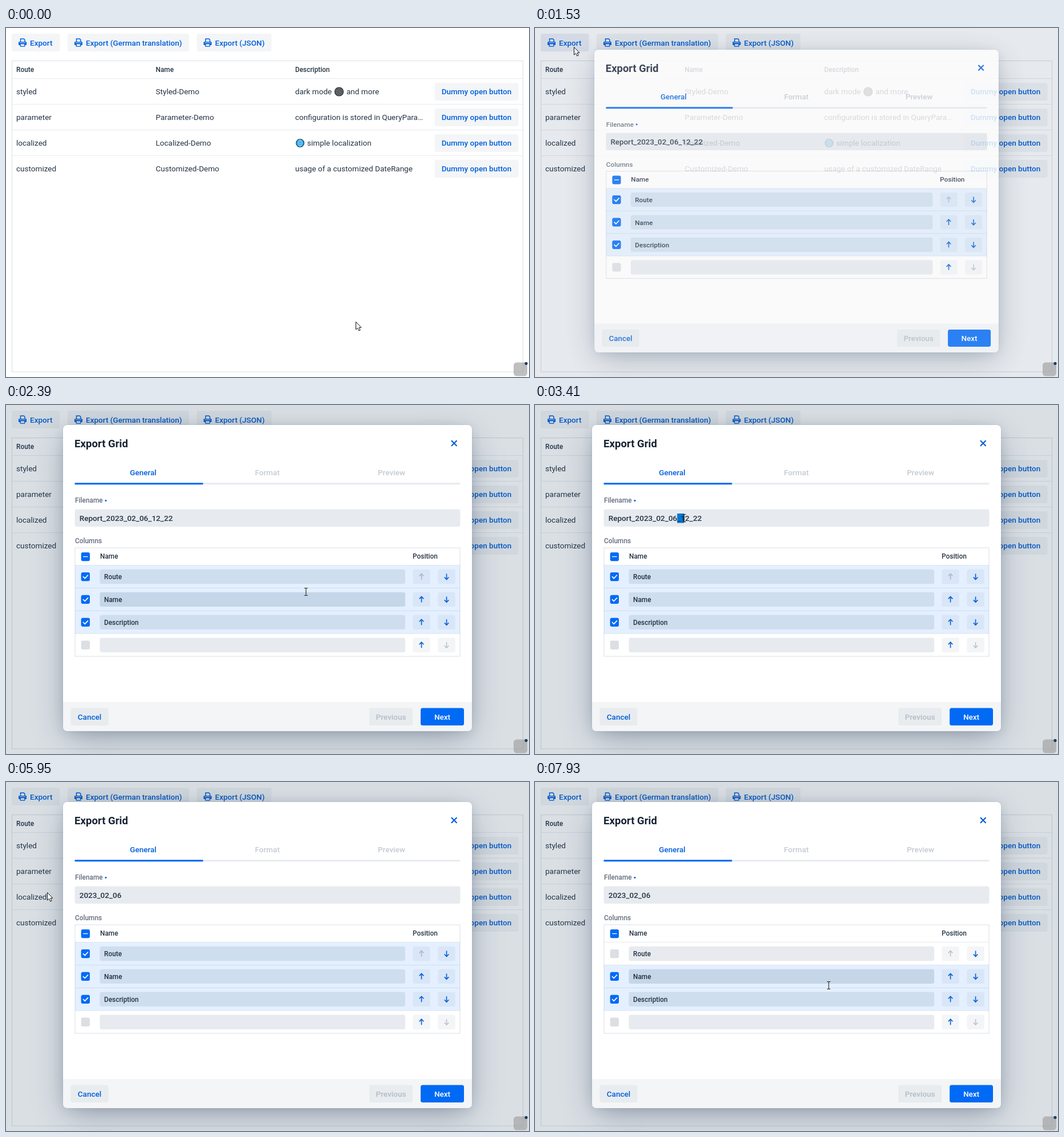
Write an HTML page that moves like this. It is 917 by 611 pixels and loops after 7990 ms.

```html
<!DOCTYPE html>
<html lang="en">
<head>
<meta charset="utf-8">
<title>Export Grid</title>
<style>
html, body { margin: 0; width: 100%; height: 100%; overflow: hidden; background: #fff; }
svg, #shade, #dialog { position: absolute; left: 0; top: 0; width: 917px; height: 611px; }
#shade { background: hsla(214, 53%, 23%, .16); }
#dialog { transform-origin: 458.5px 303px; }
#panel {
  position: absolute; left: 100px; top: 35px; width: 717px; height: 536px;
  border-radius: 7px; background: #fff;
  box-shadow: 0 0 0 1px hsla(214, 61%, 25%, .05),
    0 3px 20px -3px hsla(214, 53%, 23%, .16),
    0 15px 54px -7px hsla(214, 47%, 21%, .38);
}
text { font-family: Roboto, "Liberation Sans", sans-serif; font-size: 13.55px; fill: hsla(214, 40%, 16%, .94); white-space: pre; }
.s { font-size: 11.86px; }
.m { font-weight: 500; }
.link { fill: hsl(214, 100%, 43%); }
.label { fill: hsla(214, 42%, 18%, .69); }
.off { fill: hsla(214, 50%, 22%, .26); }
.on { fill: #fff; }
.mid { text-anchor: middle; }
.title { font-size: 18.6px; font-weight: 600; fill: hsl(214, 35%, 15%); }
</style>
</head>
<body>
<svg id="page"></svg>
<div id="shade"></div>
<div id="dialog"><div id="panel"></div><svg id="form"></svg></div>
<svg id="top"></svg>
<script>
const LOOP = 7990;
const S5 = 'hsla(214,61%,25%,.05)', S10 = 'hsla(214,57%,24%,.1)', S20 = 'hsla(214,53%,23%,.16)';
const S30 = 'hsla(214,50%,22%,.26)', BLUE = 'hsl(214,100%,48%)', LINK = 'hsl(214,100%,43%)';
const $ = id => document.getElementById(id);

function add(parent, tag, attrs, content) {
  const el = document.createElementNS('http://www.w3.org/2000/svg', tag);
  for (const k in attrs) el.setAttribute(k, attrs[k]);
  if (content !== undefined) el.textContent = content;
  parent.appendChild(el);
  return el;
}
const rect = (p, x, y, width, height, fill, rx = 0) => add(p, 'rect', { x, y, width, height, fill, rx });
// Baselines sit on whole pixels
const text = (p, x, y, str, cls = '') => add(p, 'text', { x, y: Math.round(y), class: cls }, str);
const line = (p, d, stroke, w = 1, more = {}) =>
  add(p, 'path', { d, stroke, fill: 'none', 'stroke-width': w, ...more });
const ROUND = { 'stroke-linecap': 'round', 'stroke-linejoin': 'round' };

// Page
const page = $('page');
const glow = rect(page, 6, 6, 92, 38, 'hsla(214,100%,55%,.15)', 7);
glow.style.filter = 'blur(4px)';

function printer(x) {
  const g = add(page, 'g', { transform: `translate(${x} 18)` });
  line(g, 'M3.5 6.5V1H9.3L11 2.7V6.5', LINK, 1.5);
  rect(g, 0, 6, 14, 6, LINK, 1.3);
  rect(g, 2.6, 9.3, 8.8, 5.4, LINK, .6);
  rect(g, 3.9, 10.4, 6.2, 3, '#fff');
  rect(g, 1.6, 7.3, 10.8, 1, '#dbe8fa');
}
let left = 10;
for (const [label, w] of [['Export', 84.5], ['Export (German translation)', 213], ['Export (JSON)', 131]]) {
  rect(page, left, 10, w, 31, S5, 3.5);
  printer(left + 12);
  text(page, left + 32, 31, label, 'm link');
  left += w + 13.5;
}
const exportHover = rect(page, 10, 10, 84.5, 31, 'hsla(214,100%,43%,.035)', 3.5);

add(page, 'rect', { x: 10.5, y: 57.5, width: 896, height: 544.5, fill: 'none', stroke: S20 });
const column = i => 18 + i * 244.5;
['Route', 'Name', 'Description'].forEach((s, i) => text(page, column(i), 77, s, 's m'));
['dark mode', 'configuration is stored in QueryPara…', '', 'usage of a customized DateRange'].forEach((about, i) => {
  const route = ['styled', 'parameter', 'localized', 'customized'][i];
  const title = route[0].toUpperCase() + route.slice(1) + '-Demo';
  const y = 88.5 + i * 45;
  line(page, `M11 ${y}H906`, S10);
  [route, title, about].forEach((s, j) => text(page, column(j), y + 27.5, s));
  rect(page, 751.5, y + 7.5, 147, 31, S5, 3.5);
  text(page, 825, y + 27.5, 'Dummy open button', 'm link mid');
});
text(page, 597, 116, 'and more');
text(page, 528, 206, 'simple localization');

// Moon and globe
add(page, 'circle', { cx: 584, cy: 111.5, r: 7.5, fill: '#5d5f64', stroke: '#26282c', 'stroke-width': 1.2 });
for (let i = 1; i < 8; i++) {
  const a = i * 2.4, r = 1.9 * Math.sqrt(i);
  add(page, 'circle', {
    cx: 584 + r * Math.cos(a), cy: 111.5 + r * Math.sin(a), r: 1.2,
    fill: '#35373c', stroke: '#8a8c92', 'stroke-width': .5
  });
}
add(page, 'circle', { cx: 515.7, cy: 201.5, r: 6.8, fill: '#1b9fe6', stroke: '#10496f', 'stroke-width': 1.4 });
line(page, 'M509.5 201.5h12.4M515.7 195.3v12.4M510.7 198h10M510.7 205h10', '#b5e4fc', .7);
add(page, 'ellipse', { cx: 515.7, cy: 201.5, rx: 3.2, ry: 6.3, fill: 'none', stroke: '#b5e4fc', 'stroke-width': .7 });

// Dialog
const form = $('form');
text(form, 120, 74, 'Export Grid', 'title');
line(form, 'M781.5 62.8l8.4 8.4m0-8.4l-8.4 8.4', LINK, 2.2, ROUND);
['General', 'Format', 'Preview'].forEach((s, i) =>
  text(form, 240.5 + i * 217.7, 123, s, 'm mid ' + (i ? 'off' : 'link')));
rect(form, 120.5, 136.3, 676, 3, S10, 1);
rect(form, 120.5, 136.3, 225, 3, BLUE, 1);
text(form, 121, 171, 'Filename', 's m label');
add(form, 'circle', { cx: 175, cy: 167.3, r: 1.6, fill: BLUE });
text(form, 121, 242, 'Columns', 's m label');

const fields = [];
function field(x, y, w, h) {
  rect(form, x, y, w, h, S10, 3.5);
  fields.push({ x, y, w, h, hover: rect(form, x, y, w, h, S5, 3.5) });
}
field(120.5, 182.5, 676, 30.5);
const mark = rect(form, 0, 190, 0, 16.5, '#0078d7');
const name = text(form, 128.7, 203, '', 'm');
const parts = [0, 1, 2].map(() => add(name, 'tspan', {}));

function check(y) {
  const g = add(form, 'g');
  rect(g, 131.7, y - 7.6, 15.3, 15.3, BLUE, 3);
  return g;
}
function arrowButton(x, y, dir, off) {
  rect(form, x - 15.3, y - 12.7, 30.6, 25.4, S5, 3.5);
  line(form, `M${x} ${y - 5 * dir}V${y + 4.6 * dir}M${x - 3.8} ${y + dir}L${x} ${y + 5 * dir}L${x + 3.8} ${y + dir}`,
    off ? S30 : LINK, 1.6);
}
const rows = ['Route', 'Name', 'Description', ''].map((s, i) => {
  const y = 300.5 + i * 39.9, on = add(form, 'g');
  rect(on, 121, y - 20, 675, 40, 'hsla(214,100%,60%,.13)');
  if (i) line(form, `M121 ${y - 20}H796`, S10);
  rect(form, 131.7, y - 7.6, 15.3, 15.3, S20, 3);
  const tick = check(y);
  line(tick, `M135.5 ${y + .2}l2.8 2.9l5.2 -5.6`, '#fff', 1.7, ROUND);
  field(164.5, y - 12.7, 535.5, 25.4);
  text(form, 172, y + 4.2, s, 's m');
  arrowButton(728.5, y, -1, i === 0);
  arrowButton(772.5, y, 1, i === 3);
  return [on, tick];
});
line(check(265.5), 'M135.2 265.5h8.4', '#fff', 1.3);
text(form, 165, 269, 'Name', 's m');
text(form, 713, 269, 'Position', 's m');
line(form, 'M121 280.5H796', S10);
add(form, 'rect', { x: 121, y: 250, width: 675, height: 190, fill: 'none', stroke: S20 });

add(form, 'path', { d: 'M100 520H817V564a7 7 0 0 1-7 7H107a7 7 0 0 1-7-7Z', fill: S5 });
function footButton(x, w, fill, label, cls) {
  rect(form, x, 530.5, w, 30.5, fill, 3.5);
  text(form, x + w / 2, 551, label, 'm mid ' + cls);
}
footButton(113.5, 66, S5, 'Cancel', 'link');
footButton(637, 76, S5, 'Previous', 'off');
footButton(727, 76, BLUE, 'Next', 'on');

// Badge and pointer
const topLayer = $('top');
rect(topLayer, 890, 585.5, 24, 24, 'rgba(160,160,160,.68)', 5.5);
add(topLayer, 'circle', { cx: 912, cy: 587.3, r: 2.6, fill: '#1c3a5e' });
const arrow = add(topLayer, 'path', {
  d: 'M.5 .5V14L3.6 11.2L5.8 16L8.1 15L6 10.3H9.9Z', fill: '#fff', stroke: '#111', 'stroke-linejoin': 'round'
});
const beam = line(topLayer, 'M-3 -6.5h2L0 -5.7L1 -6.5h2M0 -5.7V5.7M-3 6.5h2L0 5.7L1 6.5h2', '#222', 1.1);

// Moments of each action, ms
const OPEN = 1450, SELECT_END = 3350, CUT_END = 3900, SELECT_START = 4680, CUT_START = 5670, UNCHECK = 7300;

// Pointer gestures: start, end, target
const START = [613, 514];
const MOVES = [
  [60, 810, 107, 41],
  [900, 1140, 68, 33],
  [1700, 2390, 526, 327],
  [2500, 3260, 248, 198],
  [SELECT_END, 3650, 374, 198],
  [3850, 4560, 168, 200],
  [SELECT_START, 5420, 47, 174],
  [CUT_START, 5950, 72, 193],
  [5950, 6700, 228, 402],
  [6750, 7250, 139, 302],
  [7540, 7930, 515, 356]
];
const clamp = (v, lo = 0, hi = 1) => Math.max(lo, Math.min(hi, v));
const smooth = k => k * k * (3 - 2 * k);
const easeOut = k => 1 - (1 - k) ** 3;
const span = (t, from, length) => clamp((t - from) / length);

function pointer(t) {
  let [x, y] = START;
  for (const [from, to, tx, ty] of MOVES) {
    const k = smooth(span(t, from, to - from));
    x += (tx - x) * k;
    y += (ty - y) * k;
  }
  return [x, y];
}
const show = (el, yes) => { el.style.display = yes ? '' : 'none'; };
const inside = (x, y, r, pad) => x >= r.x && x <= r.x + r.w && y >= r.y - pad && y <= r.y + r.h + pad;

function drawName(t, x) {
  const prefix = t < CUT_START ? 'Report_' : '', date = '2023_02_06', suffix = t < CUT_END ? '_12_22' : '';
  [prefix, date, suffix].forEach((s, i) => { parts[i].textContent = s; });
  const edge = n => 128.7 + (n ? name.getSubStringLength(0, n) : 0);
  const all = prefix.length + date.length + suffix.length;
  let from = 0, to = 0;
  if (suffix && t >= SELECT_END) {
    from = edge(all - suffix.length);
    to = clamp(x, from, edge(all));
  } else if (prefix && t >= SELECT_START) {
    to = edge(prefix.length);
    from = clamp(x, edge(0), to);
  }
  mark.setAttribute('x', from);
  mark.setAttribute('width', to - from);
  const picked = to - from > 20;
  parts[0].style.fill = picked && !suffix ? '#fff' : '';
  parts[2].style.fill = picked && suffix ? '#fff' : '';
}

function draw(t) {
  const [x, y] = pointer(t);
  const grow = easeOut(span(t, OPEN + 30, 120)), open = grow > 0;
  $('shade').style.opacity = span(t, OPEN, 120);
  const d = $('dialog').style;
  d.opacity = grow;
  d.transform = grow < 1 ? `scale(${.94 + .06 * grow})` : 'none';

  show(exportHover, inside(x, y, { x: 10, y: 10, w: 84.5, h: 31 }, 0));
  glow.style.opacity = t < OPEN - 160 ? 0 : 1 - span(t, OPEN - 160, 260);

  const hot = open ? fields.findIndex(f => inside(x, y, f, 4)) : -1;
  fields.forEach((f, i) => show(f.hover, i === hot && (i > 0 || t < SELECT_END)));
  show(beam, hot >= 0);
  show(arrow, hot < 0);
  (hot < 0 ? arrow : beam).setAttribute('transform', `translate(${x} ${y})`);

  drawName(t, x);
  rows.forEach((row, i) => row.forEach(el => show(el, i < 3 && (i > 0 || t < UNCHECK))));
}
function frame() {
  draw(performance.now() % LOOP);
  requestAnimationFrame(frame);
}
frame();
</script>
</body>
</html>
```
